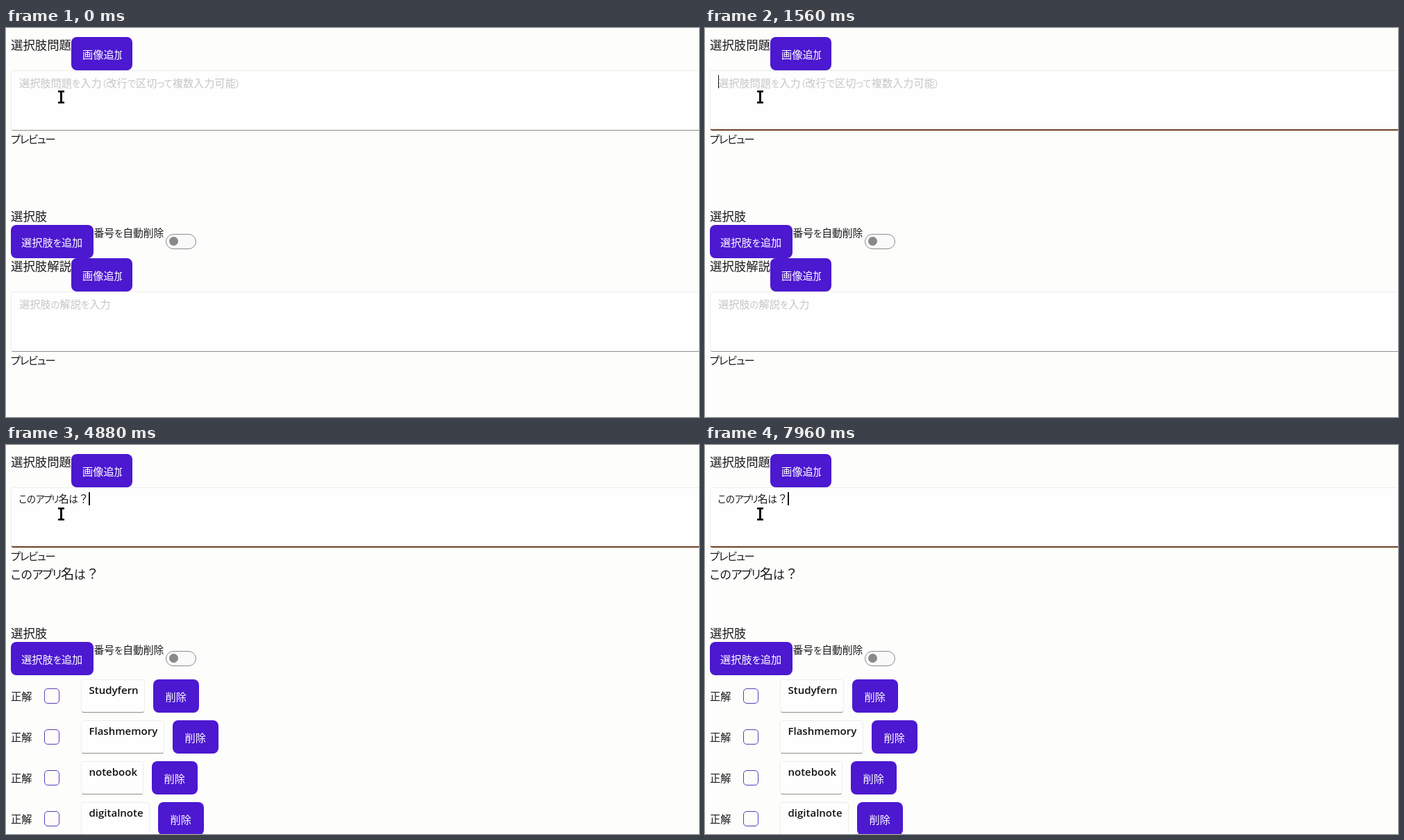
Animation of 998 by 561 pixels, one loop 8 s. Source, as an HTML page:

```html
<!DOCTYPE html>
<html lang="ja">
<head>
<meta charset="utf-8">
<title>選択肢問題</title>
<style>
  html, body { margin: 0; width: 100%; height: 100%; overflow: hidden; background: #fdfdfc; }
  #stage { position: relative; width: 998px; height: 561px; overflow: hidden; }
  #stage div, #stage svg { position: absolute; box-sizing: border-box; }
  .ja, .latin { white-space: pre; color: #1a1a1a; }
  .ja { font-family: "Noto Sans CJK JP", "Noto Sans CJK", sans-serif; line-height: 24px; }
  .ja span { font-size: .88em; line-height: 0; vertical-align: .03em; font-feature-settings: "palt"; }
  .ja .katakana { letter-spacing: -.08em; }
  .latin { font: 600 15px/20px "Open Sans", "Noto Sans", sans-serif; color: #111; }
  .button { height: 48px; border-radius: 8px; background: #4c18d0; }
  .button .ja { color: #fff; }
  .field { border: 1px solid #ededea; border-bottom-color: #8e8f86; border-radius: 4px; background: #fefefe; overflow: hidden; }
  .field.focused { border-bottom: 2px solid #6b4023; }
  .placeholder .ja { color: #c6c6c6; }
  .check { width: 22px; height: 22px; border: 1.5px solid #5a3cbc; border-radius: 5px; background: #fdfcf9; }
  .toggle { left: 230px; top: 297px; width: 44px; height: 22px; border: 1.5px solid #8c8c8c; border-radius: 11px; background: #fafafa; }
  .knob { left: 3.5px; top: 3px; width: 13px; height: 13px; border-radius: 50%; background: #898989; }
  .caret { width: 1.5px; height: 19px; background: #111; }
  .group { left: 0; top: 0; width: 998px; height: 561px; }
</style>
</head>
<body>
<div id="stage"></div>
<script>
const stage = document.getElementById("stage");
const LOOP = 8000, FOCUS = 840, PASTE = 1680, PARSE = 4880;
const SMALL = 15.2, LABEL = 17.4;
const choices = [["Studyfern", 92], ["Flashmemory", 120], ["notebook", 90], ["digitalnote", 99]];

function box(parent, className, x, y, w, h) {
  const el = document.createElement("div");
  el.className = className;
  el.style.left = x + "px";
  el.style.top = y + "px";
  if (w) el.style.width = w + "px";
  if (h) el.style.height = h + "px";
  parent.append(el);
  return el;
}

const group = () => box(stage, "group", 0, 0);

// Places Japanese text by the middle of its glyphs; kana run narrower than kanji.
function japanese(parent, x, middle, size, text) {
  const el = box(parent, "ja", x, middle - 12 - size * 0.056);
  el.style.fontSize = size + "px";
  el.innerHTML = text
    .replace(/[ぁ-ん（）]+/g, "<span>$&</span>")
    .replace(/[ァ-ヶー]+/g, '<span class="katakana">$&</span>');
  return el;
}

function latin(parent, x, baseline, text) {
  box(parent, "latin", x, baseline - 15.8).textContent = text;
}

function button(parent, x, y, w, textX, text, clipWidth) {
  const el = box(parent, "button", x, y, w);
  const label = japanese(el, textX, 25, SMALL, text);
  if (clipWidth) {
    label.style.width = clipWidth + "px";
    label.style.overflow = "hidden";
  }
}

// Question area
japanese(stage, 7, 25, LABEL, "選択肢問題");
button(stage, 94, 13, 88, 16, "画像追加", 57);
const question = box(stage, "field", 7, 61, 1010, 87);
japanese(stage, 7, 160, LABEL, "プレビュー");
japanese(stage, 7, 272, LABEL, "選択肢");
button(stage, 7, 284, 119, 15, "選択肢を追加");
japanese(stage, 126.5, 296, SMALL - 0.4, "番号を自動削除");
box(box(stage, "toggle", 230, 297), "knob", 3.5, 3);

const hint = group();
hint.classList.add("placeholder");
japanese(hint, 19, 79, SMALL, "選択肢問題を入力（改行で区切って複数入力可能）");

const pasted = group();
const lines = box(pasted, "", 8, 67, 980, 78);
lines.style.overflow = "hidden";
choices.forEach(([name], i) => latin(lines, 11, 6.7 + i * 20.75, `${i + 1}. ${name}`));

// Explanation area, shown until the choices are listed
const explanation = group();
japanese(explanation, 7, 344, LABEL, "選択肢解説");
button(explanation, 94, 332, 88, 16, "画像追加", 57);
const answer = box(explanation, "field placeholder", 7, 380, 1010, 87);
japanese(answer, 11, 17, SMALL, "選択肢の解説を入力");
japanese(explanation, 7, 479, LABEL, "プレビュー");

const parsed = group();
japanese(parsed, 18.5, 77, SMALL, "このアプリ名は？");
japanese(parsed, 7, 186, 19.2, "このアプリ名は？");
choices.forEach(([name, width], i) => {
  const y = 337.5 + i * 59;
  japanese(parsed, 7, y + 24.5, SMALL, "正解");
  box(parsed, "check", 54.5, y + 13.5);
  box(parsed, "field", 108, y, width, 48);
  latin(parsed, 119.5, y + 21.5, name);
  button(parsed, 108 + width + 11.5, y, 66, 18, "削除");
});

const caret = box(stage, "caret", 18.5, 68);
stage.insertAdjacentHTML("beforeend", `
  <svg style="left:70px;top:86px" width="18" height="28" fill="none">
    <path d="M5 5.5H14M9.5 5V22M5 21.5H14" stroke="#fff" stroke-width="4.5"/>
    <path d="M5 5.5H14M5 21.5H14" stroke="#000" stroke-width="2.5"/>
    <path d="M9.5 5V22" stroke="#000" stroke-width="3"/>
  </svg>`);

const show = (el, on) => { el.style.visibility = on ? "visible" : "hidden"; };

function render(t) {
  const isPasted = t >= PASTE && t < PARSE;
  question.classList.toggle("focused", t >= FOCUS);
  show(hint, t < PASTE);
  show(pasted, isPasted);
  show(explanation, t < PARSE);
  show(parsed, t >= PARSE);
  show(caret, t >= FOCUS);
  caret.style.left = (t < PASTE ? 18.5 : isPasted ? 115 : 119) + "px";
  caret.style.top = (isPasted ? 121.5 : 68) + "px";
}

const start = performance.now();
function tick() {
  render((performance.now() - start) % LOOP);
  requestAnimationFrame(tick);
}
tick();
</script>
</body>
</html>
```
